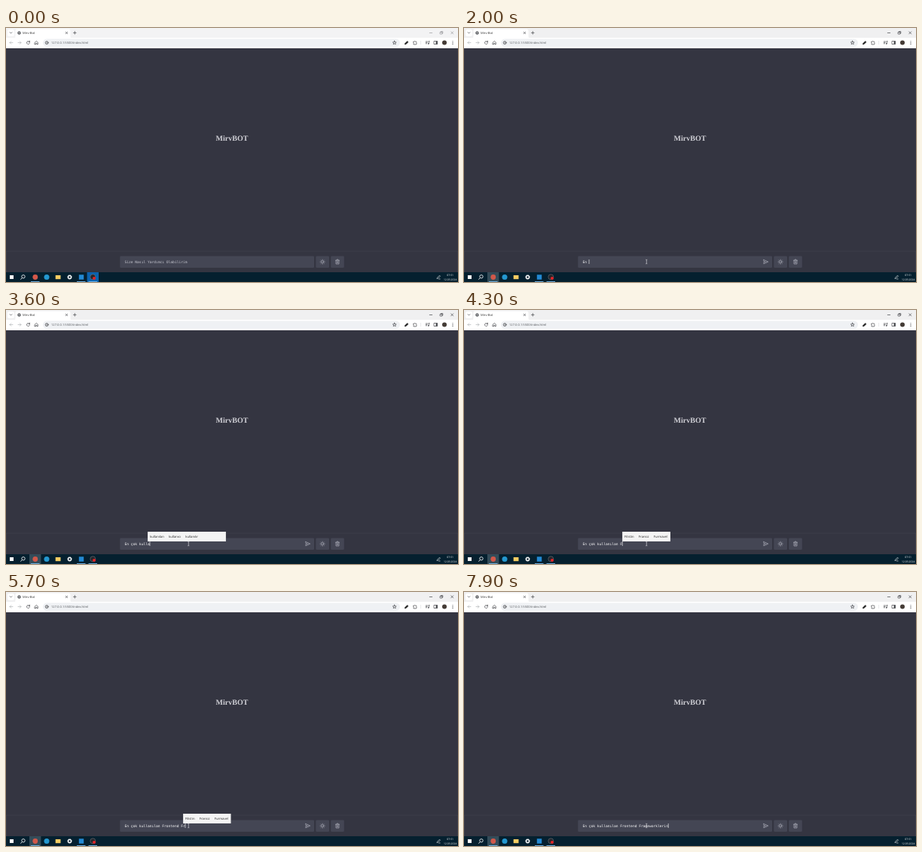
Recreate the animation shown at these times as an HTML page. Size 600 by 338 pixels, loop 8 s.

```html
<!DOCTYPE html>
<html lang="tr">
<head>
<meta charset="utf-8">
<title>Mirv-Bot</title>
<style>
  html, body { margin: 0; width: 100%; height: 100%; overflow: hidden; background: #343541; }
  #stage { display: block; width: 100vw; height: 100vh; }
  text { font-family: "Open Sans", "Noto Sans", sans-serif; text-rendering: geometricPrecision; white-space: pre; }
  .line { fill: none; stroke: #45474b; stroke-width: .7; stroke-linecap: round; stroke-linejoin: round; }
  .pale { stroke: #b4b6b9; }
  .ui { font-size: 4.08px; fill: #55585c; }
  .brand { font: bold 10px "Liberation Serif", serif; fill: #d0d0d6; text-anchor: middle; }
  .mono { font-family: "DejaVu Sans Mono", monospace; font-size: 4.6px; }
  .tool { fill: none; stroke: #b4b5c0; stroke-width: .65; stroke-linecap: round; stroke-linejoin: round; }
  .clock { font-size: 3.4px; fill: #fff; text-anchor: middle; }
  .under { fill: #76b9ed; }
  .words { font-size: 4.2px; fill: #222; word-spacing: 5.2px; }
</style>
</head>
<body>
<svg id="stage" viewBox="0 0 600 338" preserveAspectRatio="none">
  <!-- Tab strip -->
  <rect id="strip" width="600" height="14"/>
  <rect x="2" y="2" width="9" height="9" rx="2.5" fill="#fff"/>
  <path class="line" d="M5.2 5.8l1.3 1.3 1.3-1.3"/>
  <path d="M10 13.5q2.5 0 2.5-2.5V4q0-2.5 2.5-2.5h68q2.5 0 2.5 2.5v7q0 2.5 2.5 2.5z" fill="#fff"/>
  <circle cx="17.5" cy="6.5" r="2.2" fill="#55585c"/>
  <path d="M15.9 5.6l1.5.5.2 1.2-.7.8M18 4.7l.2 1 1.1.4" fill="none" stroke="#fff" stroke-width=".5"/>
  <text x="22" y="8" class="ui" style="fill:#333">Mirv-Bot</text>
  <path class="line" d="M79.3 5.3l2.4 2.4m0-2.4l-2.4 2.4M89.5 6.4h3.6m-1.8-1.8v3.6"/>
  <g id="controls">
    <path class="line" d="M562.3 6.5h3.4M576.5 5.5h2.5V8h-2.5zM577.3 5.4v-.8h2.5v2.5h-.7M590.7 4.9l3 3m0-3l-3 3" stroke-width=".6"/>
  </g>

  <!-- Toolbar -->
  <rect y="13" width="600" height="14" fill="#fff"/>
  <path class="line pale" d="M9 19.5H5m1.8-1.8L5 19.5l1.8 1.8M16 19.5h4m-1.8-1.8l1.8 1.8-1.8 1.8"/>
  <path class="line" d="M31.2 18.4a2 2 0 1 0 .3 1.6M31.5 17.2v1.5H30M38.3 19.2l2-1.8 2 1.8v2.6h-1.3v-1.5h-1.4v1.5h-1.3z"/>
  <rect x="49" y="14.4" width="474" height="10.4" rx="5.2" fill="#eff1f4"/>
  <circle cx="54.2" cy="19.6" r="2" class="line"/>
  <path class="line" d="M54.2 19.4v1.1m0-2v.1"/>
  <text x="60" y="21.2" class="ui">127.0.0.1:5500/index.html</text>
  <path class="line" d="M515.7 17.2l.7 1.6 1.7.1-1.3 1.1.4 1.7-1.5-.9-1.5.9.4-1.7-1.3-1.1 1.7-.1z"/>
  <path d="M529.4 22l.4-1.7 2.9-2.9 1.3 1.3-2.9 2.9z" fill="#222" stroke="#222" stroke-width=".5"/>
  <path class="line" d="M541 18.2h1.2q.5-1.6 1.2 0h1.3v1.2q1.4.5 0 1.3v1.2H541v-1.2q1-.6 0-1.3z"/>
  <path d="M550.6 17v5" stroke="#d8dadd" stroke-width=".6"/>
  <path class="line" d="M557.3 18h2.6m-2.6 1.4h1.8m-1.8 1.4h1.2M561.4 17.7v3m0-3h.7"/>
  <circle cx="560.8" cy="20.9" r=".8" fill="#45474b"/>
  <rect x="568.4" y="17.5" width="4.2" height="4" class="line"/>
  <rect x="570.6" y="17.5" width="2" height="4" fill="#45474b"/>
  <circle cx="582" cy="19.6" r="3" fill="#443b35"/>
  <g fill="#45474b"><circle cx="593" cy="17.8" r=".55"/><circle cx="593" cy="19.6" r=".55"/><circle cx="593" cy="21.4" r=".55"/></g>

  <!-- Page -->
  <rect y="27" width="600" height="299" fill="#343541"/>
  <text x="300" y="150.2" class="brand">MirvBOT</text>
  <rect x=".3" y="297" width="599.4" height="28.5" fill="none" stroke="#42434e" stroke-width=".6"/>
  <g fill="#444654">
    <rect x="151.3" y="303.5" width="257.7" height="15.5" rx="1.3"/>
    <rect x="411.3" y="303.5" width="17.7" height="15.5" rx="1.3"/>
    <rect x="431.2" y="303.5" width="17.6" height="15.5" rx="1.3"/>
  </g>
  <text id="typed" x="157.5" y="312.6" class="mono"></text>
  <path id="caret" d="M0 308v6" stroke="#fff" stroke-width=".6"/>
  <path id="send" class="tool" d="M397.8 308.4l6 2.7-6 2.7.5-2.7zM398.3 311.1h2.5"/>
  <circle cx="420.1" cy="311.2" r="1.5" class="tool"/>
  <g id="rays" class="tool"></g>
  <path class="tool" d="M437.5 309.2h5M439 309v-.9h2v.9M438 309.4v4.6h4v-4.6M439.3 310.6v2.2m1.4-2.2v2.2"/>
  <svg id="popup" y="295" height="13">
    <rect width="100%" height="13" fill="#f4f4f4" stroke="#d4d4d4" stroke-width=".8"/>
    <text id="words" x="3" y="8.2" class="words"></text>
  </svg>

  <!-- Taskbar -->
  <rect y="325" width="600" height="13" fill="#05202f"/>
  <rect id="active" y="325" width="15.4" height="13"/>
  <rect x="5" y="329" width="5" height="5" fill="#fff"/>
  <circle cx="23" cy="330.8" r="2.2" fill="none" stroke="#fff" stroke-width=".8"/>
  <path d="M21.4 332.5l-2 2.1" stroke="#fff" stroke-width=".9"/>
  <circle cx="38.8" cy="331.5" r="3.4" fill="#d1584a"/>
  <circle cx="54" cy="331.5" r="3.5" fill="#2498d0"/>
  <rect x="65.7" y="329" width="6.8" height="5.2" fill="#f3cc62"/>
  <circle cx="84.5" cy="331.5" r="2" fill="none" stroke="#fff" stroke-width="1.3"/>
  <circle cx="84.5" cy="331.5" r="2.8" fill="none" stroke="#fff" stroke-width=".7" stroke-dasharray="1.1"/>
  <rect x="96.8" y="328.3" width="6.4" height="6.4" fill="#2389d3"/>
  <circle cx="115.3" cy="331.3" r="3.5" fill="#25252b" stroke="#85878d" stroke-width=".5"/>
  <circle cx="117" cy="333" r="2.1" fill="#df2428"/>
  <rect x="33" y="337.1" width="11.5" height=".9" class="under"/>
  <rect x="94" y="337.1" width="11.5" height=".9" class="under"/>
  <rect x="109.5" y="337.1" width="11.5" height=".9" class="under"/>
  <path d="M572 333.7l.5-1.5 3-3 1 1-3 3zM574 334h2.6" fill="none" stroke="#fff" stroke-width=".55"/>
  <text x="589.7" y="330.3" class="clock">07:51</text>
  <text x="589.7" y="336.3" class="clock">12.03.2024</text>

  <!-- Pointers -->
  <path id="arrow" d="M0 0v6.4l1.5-1.4 1 2.2 1-.4-1-2.2h2.1z" fill="#fff" stroke="#000" stroke-width=".3"/>
  <path id="beam" d="M241.3 308.2q1 0 1 .6 0-.6 1-.6M242.3 308.8v4.4M241.3 313.8q1 0 1-.6 0 .6 1 .6" fill="none" stroke="#e4e4e8" stroke-width=".6"/>
</svg>
<script>
const LOOP = 8000, FOCUS = 600, CARET_OFF = 1050;
const LEFT = 157.5, CHAR = 2.769;
const HINT = "Size Nasıl Yardımcı Olabilirim";
const QUERY = "En çok kullanılan Frontend Frameworklerin";
const F_WORDS = "Filistin Fransız Furmavel";

// [time, characters typed]
const keys = [
  [1400, 1], [1600, 2], [1900, 3], [2100, 4], [2300, 5], [2600, 6], [2700, 7], [2800, 8],
  [3100, 9], [3300, 10], [3400, 11], [3600, 12], [3700, 13], [3800, 14], [3900, 15], [4000, 17],
  [4200, 18], [4300, 19], [4500, 20], [4600, 21], [4700, 22], [4800, 23], [4900, 24], [5000, 25],
  [5200, 26], [5300, 27], [5500, 28], [5700, 29], [5900, 30], [6000, 31], [6200, 32], [6300, 33],
  [6500, 34], [6700, 35], [7100, 36], [7200, 37], [7300, 38], [7400, 40], [7600, 41]
];
// [from, until, column, width, suggestions]
const popups = [
  [1500, 1700, 1, 50, "Evet En Ev"],
  [2200, 2400, 4, 69, "çok çocuk çünkü"],
  [2900, 3000, 8, 40, "kimse kabul kadar"],
  [3000, 3200, 8, 58, "kimse kabul kadar"],
  [3200, 3400, 10, 64, "kulak kullan kulüp"],
  [3600, 4000, 11, 104, "kullanılan kullanıcı kullanılır"],
  [4300, 4600, 19, 64, F_WORDS],
  [5000, 5200, 25, 50, "Fronte Frontal"],
  [5600, 6000, 28, 63.5, F_WORDS],
  [6300, 6500, 33, 63, "Frame Framer"],
  [7800, 7900, 41, 47, "lerin lerini"]
];

const el = id => document.getElementById(id);
const show = (id, on) => el(id).setAttribute("visibility", on ? "visible" : "hidden");
const set = (id, name, value) => el(id).setAttribute(name, value);
const columnX = n => LEFT + n * CHAR;

el("rays").innerHTML = Array.from({ length: 8 }, (_, i) =>
  `<path d="M422.6 311.2h.6" transform="rotate(${i * 45} 420.1 311.2)"/>`).join("");

function draw(t) {
  const focused = t >= FOCUS;
  set("strip", "fill", focused ? "#f0f0f1" : "#f3f3f4");
  set("controls", "opacity", focused ? 1 : .5);
  set("active", "x", focused ? 31 : 107.6);
  set("active", "fill", focused ? "#344c59" : "#0b62ae");

  const p = Math.min(1, Math.max(0, (t - 100) / (FOCUS - 100)));
  const ease = p * p * (3 - 2 * p);
  set("arrow", "transform", `translate(${116 + 126 * ease} ${331 - 20 * ease})`);
  show("arrow", t >= 100 && !focused);
  show("beam", focused);

  const count = keys.reduce((n, [time, typed]) => t >= time ? typed : n, 0);
  el("typed").textContent = count ? QUERY.slice(0, count) : HINT;
  set("typed", "fill", count ? "#fff" : "#c9cad3");
  set("caret", "transform", `translate(${columnX(count) + .2} 0)`);
  show("caret", count || (focused && t < CARET_OFF));
  show("send", count);

  const popup = popups.find(([from, until]) => t >= from && t < until);
  show("popup", popup);
  if (popup) {
    const [, , column, width, words] = popup;
    set("popup", "x", columnX(column));
    set("popup", "width", width);
    el("words").textContent = words;
  }
}

function tick() {
  draw(performance.now() % LOOP);
  requestAnimationFrame(tick);
}
tick();
</script>
</body>
</html>
```
